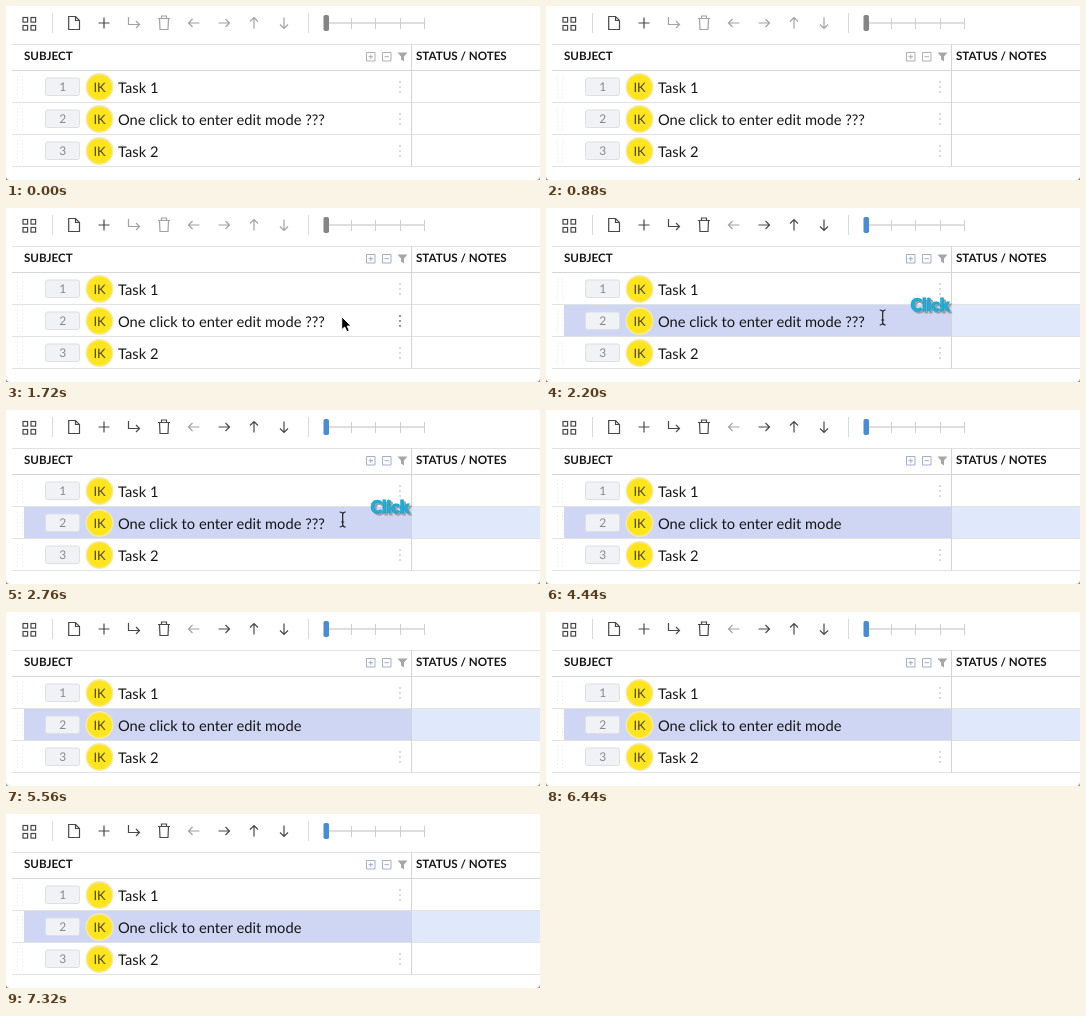
Animation, 534 px wide and 174 px high, one loop 7.36 s. Source, as an HTML page:

```html
<!DOCTYPE html>
<html lang="en">
<head>
<meta charset="utf-8">
<title>Task list edit</title>
<style>
  html, body { margin: 0; width: 100%; height: 100%; overflow: hidden; background: #fff; }
  svg { display: block; width: 534px; height: 174px; font-family: Lato, sans-serif; text-rendering: geometricPrecision; }
  .icon { fill: none; stroke: #484848; stroke-width: 1.2; }
  .head { font-size: 11.6px; font-weight: 700; fill: #161616; }
  .task { font-size: 14.7px; fill: #161616; white-space: pre; }
  .num { font-size: 12px; fill: #858991; text-anchor: middle; }
  .initials { font-size: 13px; fill: #494320; text-anchor: middle; }
  .click { font-size: 17.5px; font-weight: 900; }
</style>
</head>
<body>
<svg id="stage" viewBox="0 0 534 174"></svg>
<script>
const LOOP = 7360;
const SELECT = 2040, CLICK_END = 3960;
const ERASE = [3400, 3600, 3800];
const TITLE = "One click to enter edit mode ";
const stage = document.getElementById("stage");

function add(tag, attrs, text, parent = stage) {
  const node = document.createElementNS("http://www.w3.org/2000/svg", tag);
  for (const key in attrs) node.setAttribute(key, attrs[key]);
  if (text) node.textContent = text;
  return parent.appendChild(node);
}
const rect = (x, y, width, height, fill, more) => add("rect", { x, y, width, height, fill, ...more });
const path = (d, more) => add("path", { d, class: "icon", ...more });
const label = (x, y, name, text, more, parent) => add("text", { x, y, class: name, ...more }, text, parent);
const show = (node, on) => node.setAttribute("visibility", on ? "visible" : "hidden");

rect(0, 0, 534, 174, "#fff");

// Toolbar
for (const x of [17, 25]) for (const y of [11.5, 19.5])
  rect(x, y, 4.6, 4.6, "none", { class: "icon" });
for (const x of [46, 302]) rect(x, 7, 1, 20, "#d9d9d9");
path("M62.7 10.5H69.5L73.5 14.5V23.5H62.7ZM69.5 10.5V14.5H73.5");
path("M92.5 17H103.5M98 11.5V22.5");
const arrow = (x, turn) => path("M-5.5 0H5.5M1.5 -4L5.5 0L1.5 4", { transform: `translate(${x} 17) rotate(${turn})` });
arrow(188, 180).style.stroke = "#a2a2a2";
const tools = [
  path("M122.5 11V18.5H133.5M130 15L133.5 18.5L130 22"),
  path("M152 12.5H164M155.5 12V10H160.5V12M153.5 12.5L154 23.5H162L162.5 12.5"),
  arrow(218, 0), arrow(248, -90), arrow(278, 90)
];
rect(320, 16, 99, 2, "#dedede");
for (const x of [345, 369, 394, 418]) rect(x, 12, 1, 11, "#cfcfcf");
const thumb = rect(317.5, 9, 5.5, 16, "#858585", { rx: 1.8 });

// Table
const subjectCell = rect(18, 97, 387, 32, "#cfd6f3");
const notesCell = rect(406, 97, 128, 32, "#dfe9fb");
for (const y of [38, 64, 96, 128, 160]) rect(6, y, 528, 1, y === 64 ? "#d6d6d6" : "#e2e2e2");
rect(405, 38, 1, 123, "#d4d4d4");
label(18, 54.3, "head", "SUBJECT");
label(410, 54.3, "head", "STATUS / NOTES");

const headIcons = [
  path("M360.5 46.5H369V55H360.5ZM362.5 50.7H367M364.75 48.5V53"),
  path("M376.5 46.5H385V55H376.5ZM378.5 50.7H383")
];
headIcons.forEach(icon => icon.style.strokeWidth = 0.9);
path("M391.5 46.5H401.5L398 50.5V55.5L395 53.5V50.5Z", { style: "fill:#a6a6a6;stroke:none" });

const rows = ["Task 1", TITLE + "???", "Task 2"].map((text, i) => {
  const y = 81 + i * 32;
  for (let k = 0; k < 14; k++)
    rect(11 + k % 2 * 5, y - 11 + (k >> 1) * 3.5, 1, 1, "#e9e9e9");
  rect(39.5, y - 9, 34, 17.5, "#f0f2f5", { rx: 2, stroke: "#dcdfe4" });
  label(56.8, y + 4, "num", String(i + 1));
  add("circle", { cx: 93.5, cy: y, r: 14, fill: "#f4eab0" });
  add("circle", { cx: 93.5, cy: y, r: 12.6, fill: "#ffe51d" });
  label(93.6, y + 4.8, "initials", "IK");
  const title = label(112, y + 5.6, "task", text);
  const dots = add("g", { fill: "#c8c8c8" });
  for (const dy of [-5, 0, 5]) add("circle", { cx: 394, cy: y + dy, r: 0.9 }, "", dots);
  return { title, dots };
});

// Click label and pointers
const click = add("g", { class: "click" });
label(366.5, 104.5, "click", "Click", { fill: "#9aa0a8", stroke: "#9aa0a8" }, click);
label(364.5, 102.5, "click", "Click",
  { fill: "#14b4e2", stroke: "#1597c0", "stroke-width": 0.6 }, click);
const pointer = path("M0 0V13L3 10.3L5.2 15L7.6 13.9L5.5 9.4H9.5Z",
  { style: "fill:#000;stroke:#fff;stroke-width:1" });
const beam = path("M-3 -7.5Q0 -7.5 0 -5Q0 -7.5 3 -7.5M0 -5.5V5.5M-3 7.5Q0 7.5 0 5Q0 7.5 3 7.5M-1.5 2.5H1.5",
  { transform: "translate(336.7 109.5)", style: "stroke:#222;stroke-width:1.2" });

// Window corners
path("M0 170Q0 174 4 174H0ZM534 170Q534 174 530 174H534Z", { style: "fill:#8c8c8c;stroke:none" });

function draw(time) {
  const t = time % LOOP;
  const selected = t >= SELECT;
  const hovered = t >= 1400 && !selected;
  const glide = Math.min(1, Math.max(0, (t - 1200) / 400));
  const ease = 1 - (1 - glide) ** 3;

  tools.forEach(icon => icon.style.stroke = selected ? "#484848" : "#a2a2a2");
  thumb.setAttribute("fill", selected ? "#468cd6" : "#858585");
  headIcons.forEach(icon => icon.style.stroke = t >= 1600 ? "#93a8c4" : "#a6a6a6");
  show(subjectCell, selected);
  show(notesCell, selected);
  show(rows[1].dots, !selected);
  rows[1].dots.setAttribute("fill", hovered ? "#666" : "#c8c8c8");

  const erased = ERASE.filter(at => t >= at).length;
  rows[1].title.textContent = TITLE + "?".repeat(3 - erased);

  show(click, selected && t < CLICK_END);
  show(pointer, t >= 1200 && !selected);
  pointer.setAttribute("transform", `translate(${335.7 + 24 * (1 - ease)} ${108.7 + 20 * (1 - ease)})`);
  show(beam, selected && t < ERASE[0]);
}

const start = performance.now();
function tick() {
  draw(performance.now() - start);
  requestAnimationFrame(tick);
}
draw(0);
requestAnimationFrame(tick);
</script>
</body>
</html>
```
